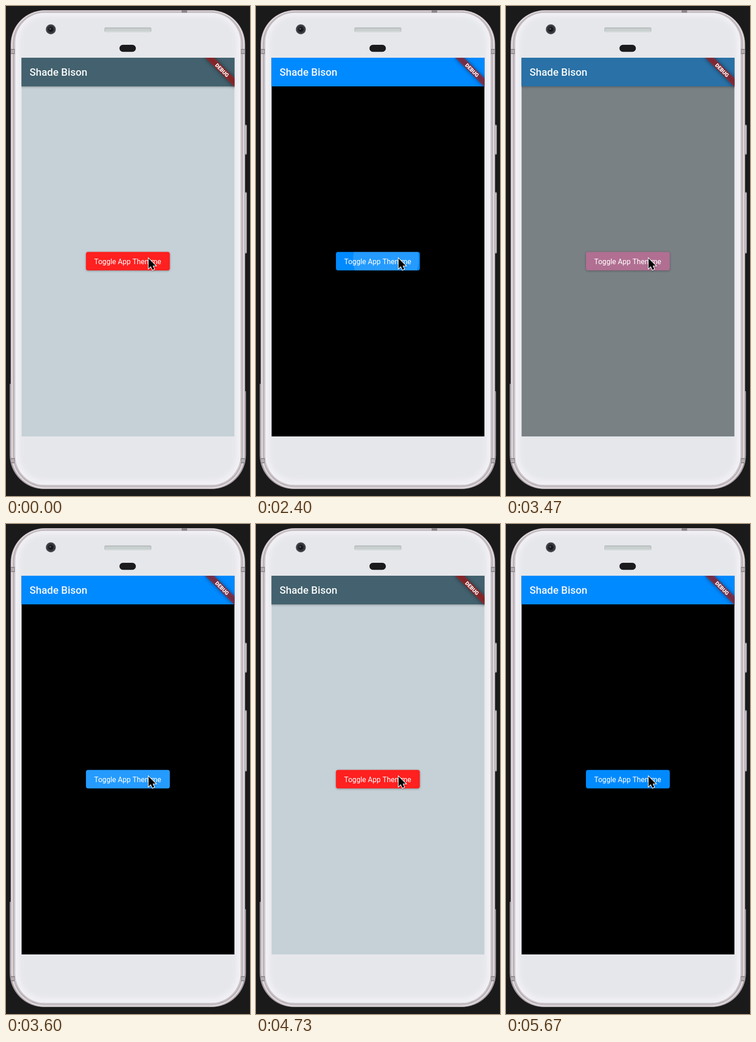
Animation of 528x1061 px, one loop 5.74 s. Source, as an HTML page with a canvas:

```html
<!DOCTYPE html>
<html lang="en">
<head>
<meta charset="utf-8">
<title>Theme toggle</title>
<style>
  html, body { margin: 0; width: 100%; height: 100%; overflow: hidden; background: #1a1a1a; }
  canvas { display: block; width: 100vw; height: 100vh; }
</style>
</head>
<body>
<canvas id="stage" width="528" height="1061"></canvas>
<script>
const LOOP = 5740, TICK = 1000 / 15;
const GROW = 150, FADE_IN = 50, HOLD = 225, FADE_OUT = 150, THEME = 200;
const DP = 461 / 411.4;
const TAPS = [
  { down: 1000.5, up: 1075 },
  { down: 2347, up: 2420 },
  { down: 3145, up: 3390 },
  { down: 4015, up: 4345 },
  { down: 5080, up: 5285 }
];
const SCREEN = { x: 33.5, y: 112, w: 461, h: 820 };
const BAR_H = 62;
const BUTTON = { x: 173, y: 532.5, w: 181.5, h: 40 };
const TIP = { x: 308, y: 545 };
const COLORS = {
  bar: [[67, 97, 110], [0, 138, 255]],
  page: [[197, 209, 215], [0, 0, 0]],
  button: [[255, 32, 32], [0, 138, 255]]
};

const stage = document.getElementById('stage');
const main = stage.getContext('2d');
const clamp = v => Math.max(0, Math.min(1, v));
const mix = (a, b, k) => a + (b - a) * k;
const tone = (name, k) => {
  const [a, b] = COLORS[name];
  return `rgb(${a.map((v, i) => Math.round(mix(v, b[i], k))).join(',')})`;
};

// cubic-bezier(.25, .1, .25, 1)
function ease(x) {
  const curve = (s, a, b) => 3 * a * s * (1 - s) ** 2 + 3 * b * s * s * (1 - s) + s ** 3;
  let lo = 0, hi = 1;
  for (let i = 0; i < 20; i++) {
    const mid = (lo + hi) / 2;
    if (curve(mid, 0.25, 0.25) < x) lo = mid; else hi = mid;
  }
  return curve(lo, 0.1, 1);
}

function box(c, x, y, w, h, r, fill) {
  c.beginPath();
  c.roundRect(x, y, w, h, r);
  if (fill) { c.fillStyle = fill; c.fill(); }
}

function disc(c, x, y, r, fill) {
  c.beginPath();
  c.arc(x, y, r, 0, Math.PI * 2);
  c.fillStyle = fill;
  c.fill();
}

function shadow(c, color, blur, dy) {
  c.shadowColor = color;
  c.shadowBlur = blur;
  c.shadowOffsetY = dy;
}

function label(c, text, x, y, font, color) {
  c.font = font + ' Roboto, sans-serif';
  c.fillStyle = color;
  c.fillText(text, x, y);
}

function drawPhone(c) {
  c.fillStyle = '#1a1a1a';
  c.fillRect(0, 0, 528, 1061);

  // side keys
  for (const [y, h] of [[257, 65], [403, 133]]) {
    box(c, 514, y, 7.3, h, 2, '#8f898e');
    box(c, 517.8, y + 2, 2.2, h - 4, 1, '#d5cfd4');
  }

  // metal rim, a little wider at the foot
  box(c, 8, 818, 80, 228, [1, 0, 0, 74], '#a39ba0');
  box(c, 440, 834, 79.3, 212, [0, 1, 74, 0], '#a39ba0');
  const rim = [
    [0, '#aaa2a7'], [1.3, '#e0d9dd'], [4, '#d0c8cd'],
    [6, '#958e93'], [7, '#ddd6da'], [8.7, '#aaa4a9'], [9.7, '#f5f4f7']
  ];
  for (const [i, color] of rim) {
    const top = 9 + i * 0.6;
    box(c, 10 + i, top, 507.5 - i * 2, 1046 - i * 0.9 - top, 74 - i, color);
  }

  // antenna gaps
  for (const y of [93, 979]) {
    for (const x of [10, 508.5]) {
      box(c, x, y, 9, 11, 0, '#8b858a');
      box(c, x + 1, y + 2, 7, 7, 0, '#b6afb4');
    }
  }
  box(c, 380, 9.5, 12, 5, 0, '#8b858a');

  // glass front
  c.save();
  box(c, 20, 15, 487.5, 1022, 64);
  c.clip();
  c.fillStyle = '#f1f0f4';
  c.fillRect(20, 15, 487.5, 1022);
  c.filter = 'blur(4px)';
  box(c, 30, 23, 468, 1003, 52, '#e6e7eb');
  c.restore();

  // speaker
  box(c, 213, 46.5, 101.5, 10, 3, '#b2b8b8');
  box(c, 214, 48.5, 99.5, 7, 2.5, '#c9cfce');
  box(c, 214, 54.8, 99.5, 1.5, 1, '#d9dedd');

  // camera and sensor
  disc(c, 97, 50.5, 10.7, '#46474d');
  disc(c, 97, 50.5, 8, '#303137');
  disc(c, 97, 50.5, 5, '#15161a');
  disc(c, 95.7, 49.5, 2, '#4d5665');
  box(c, 245.5, 84, 35.5, 15.3, 7.6, '#1b1b1d');
}

function drawBanner(c) {
  c.save();
  c.translate(SCREEN.x + SCREEN.w, SCREEN.y);
  c.rotate(Math.PI / 4);
  const far = 40 * DP, thick = 12 * DP;
  const strip = () => c.fillRect(-far, far - thick, far * 2, thick);
  // only the blur of the offset strip lands on the stage
  c.save();
  c.shadowColor = 'rgba(0,0,0,.5)';
  c.shadowBlur = 9;
  c.shadowOffsetX = 2000;
  c.translate(-2000 * Math.SQRT1_2, 2000 * Math.SQRT1_2);
  c.fillStyle = '#000';
  strip();
  c.restore();
  c.fillStyle = 'rgba(183,28,28,.627)';
  strip();
  c.textAlign = 'center';
  label(c, 'DEBUG', 0, far - thick / 2 + 4.1, `900 ${10.2 * DP}px`, '#fff');
  c.restore();
}

function drawRipple(c, t, dark) {
  for (const { down, up } of TAPS) {
    const age = t - down;
    const fade = 1 - clamp((t - up - HOLD) / FADE_OUT);
    if (age <= 0 || fade <= 0) continue;
    const k = ease(clamp(age / GROW));
    const reach = Math.hypot(BUTTON.w, BUTTON.h) / 2;
    const x = mix(TIP.x, BUTTON.x + BUTTON.w / 2, k);
    const y = mix(TIP.y, BUTTON.y + BUTTON.h / 2, k);
    const alpha = mix(0.25, 0.145, dark) * clamp(age / FADE_IN) * fade;
    c.save();
    box(c, BUTTON.x, BUTTON.y, BUTTON.w, BUTTON.h, 4.5);
    c.clip();
    disc(c, x, y, mix(reach * 0.3, reach + 5 * DP, k), `rgba(255,255,255,${alpha})`);
    c.restore();
  }
}

function drawCursor(c) {
  const points = [[0, 0], [0, 21.8], [5, 17], [8.5, 24.7], [12.4, 23], [9, 15.7], [15.8, 15.7]];
  c.save();
  c.translate(308.4, 546.5);
  c.beginPath();
  points.forEach(([x, y]) => c.lineTo(x, y));
  c.closePath();
  c.lineJoin = 'miter';
  c.lineWidth = 2.6;
  c.strokeStyle = '#fff';
  c.save();
  shadow(c, 'rgba(0,0,0,.25)', 3, 1);
  c.stroke();
  c.restore();
  c.fillStyle = '#000';
  c.fill();
  c.restore();
}

function themeAt(t) {
  let dark = 0;
  TAPS.forEach(({ up }, i) => {
    if (t < up) return;
    const k = clamp((t - up) / THEME);
    dark = i % 2 ? 1 - k : k;
  });
  return dark;
}

function drawScreen(c, t) {
  const dark = themeAt(t);
  const { x, y, w, h } = SCREEN;
  c.save();
  c.beginPath();
  c.rect(x, y, w, h);
  c.clip();
  c.fillStyle = tone('page', dark);
  c.fillRect(x, y, w, h);

  c.save();
  shadow(c, 'rgba(0,0,0,.35)', 5, 1);
  c.fillStyle = tone('bar', dark);
  c.fillRect(x - 10, y - 10, w + 20, BAR_H + 10);
  c.restore();
  label(c, 'Shade Bison', 51, 151, `500 ${20 * DP}px`, '#f7f9fa');
  drawBanner(c);

  c.save();
  shadow(c, 'rgba(0,0,0,.35)', 4, 1);
  box(c, BUTTON.x, BUTTON.y, BUTTON.w, BUTTON.h, 4.5, tone('button', dark));
  c.restore();
  drawRipple(c, t, dark);
  label(c, 'Toggle App Themme', 190.8, 558.5, `400 ${14 * DP}px`, '#fff');
  c.restore();
  drawCursor(c);
}

const phone = document.createElement('canvas');
phone.width = stage.width;
phone.height = stage.height;
drawPhone(phone.getContext('2d'));

const start = performance.now();
function frame() {
  const t = (performance.now() - start) % LOOP;
  main.drawImage(phone, 0, 0);
  drawScreen(main, Math.floor((t + 5) / TICK) * TICK);
  requestAnimationFrame(frame);
}
frame();
</script>
</body>
</html>
```
